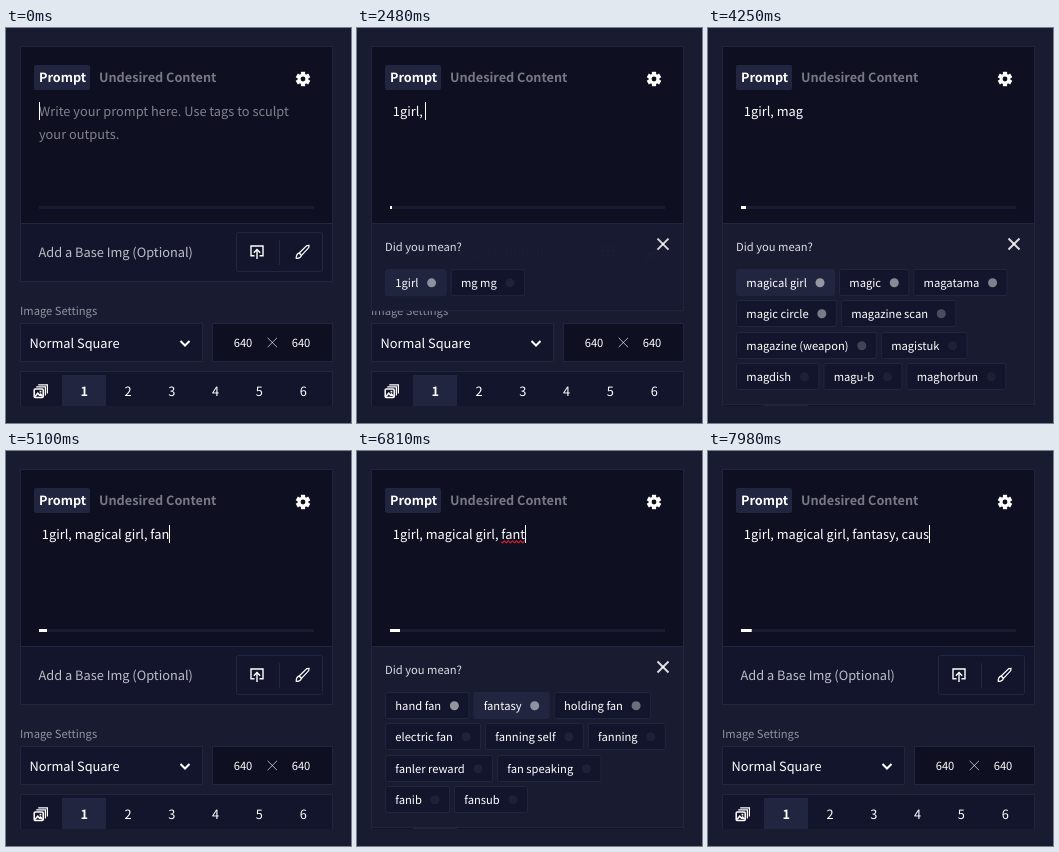
These frames come from a looping animation (345x395 px, 8000 ms). An HTML page with a canvas:

```html
<!DOCTYPE html>
<html lang="en">
<head>
<meta charset="utf-8">
<title>Prompt suggestions</title>
<style>
  html, body { margin: 0; width: 100%; height: 100%; overflow: hidden; background: #191b31; }
  canvas { display: block; width: 345px; height: 395px; }
</style>
</head>
<body>
<canvas id="stage"></canvas>
<script>
const W = 345, H = 395, LOOP = 8000;
const canvas = document.getElementById('stage');
const ctx = canvas.getContext('2d');
const dpr = window.devicePixelRatio || 1;
canvas.width = W * dpr;
canvas.height = H * dpr;

const FAMILY = '"Noto Sans CJK JP", "Noto Sans CJK SC", "Noto Sans CJK", "Source Sans 3", "Open Sans", sans-serif';
const NORMAL = `12.8px ${FAMILY}`;
const SMALL = `11.2px ${FAMILY}`;
const BOLD = `bold 12.7px ${FAMILY}`;

const C = { page: '#191b31', field: '#0e0f21', panel: '#13152c', line: '#22253f', white: '#fff' };
const white = a => `rgba(255,255,255,${a})`;
const clamp = v => Math.max(0, Math.min(1, v));
const ramp = (t, start, length) => clamp((t - start) / length);
const easeOut = p => 1 - (1 - p) * (1 - p);

// time, prompt text, width of the token bar
const typing = [
  [0, '', 0],
  [850, '1', 1],
  [1010, '1g', 2],
  [2480, ' 1girl, ', 3.5],
  [2990, ' 1girl, m', 4],
  [3070, ' 1girl, ma', 4.5],
  [3150, ' 1girl, mag', 5],
  [4560, ' 1girl, magical girl, ', 7],
  [5000, ' 1girl, magical girl, f', 7.5],
  [5050, ' 1girl, magical girl, fa', 8],
  [5100, ' 1girl, magical girl, fan', 8.5],
  [5180, ' 1girl, magical girl, fant', 10],
  [6910, ' 1girl, magical girl, fantasy, ', 10],
  [7800, ' 1girl, magical girl, fantasy, c', 10.2],
  [7860, ' 1girl, magical girl, fantasy, ca', 10.4],
  [7920, ' 1girl, magical girl, fantasy, cau', 10.7],
  [7980, ' 1girl, magical girl, fantasy, caus', 11]
];

// the caret toggles at each of these times, starting visible
const blinks = [380, 770, 1400, 1840, 2230, 2480, 3390, 3760, 4150, 4560, 4940, 5000, 6120, 6510, 7190, 7580];

// each tag: name, dot opacity
const popups = [
  { from: 1390, to: 2480, hover: { '1girl': [1820, 2700] },
    rows: [[['1girl', .5], ['mg mg', .06]]] },
  { from: 3610, to: 4550, hover: { 'magical girl': [4140, 4800] },
    rows: [
      [['magical girl', .52], ['magic', .5], ['magatama', .46]],
      [['magic circle', .44], ['magazine scan', .24]],
      [['magazine (weapon)', .2], ['magistuk', .05]],
      [['magdish', .05], ['magu-b', .05], ['maghorbun', .05]]
    ] },
  { from: 5560, to: 6905, hover: { 'hand fan': [5930, 6120], 'fantasy': [6160, 7200] },
    rows: [
      [['hand fan', .55], ['fantasy', .5], ['holding fan', .38]],
      [['electric fan', .06], ['fanning self', .06], ['fanning', .05]],
      [['fanler reward', .05], ['fan speaking', .05]],
      [['fanib', .05], ['fansub', .05]]
    ] }
];

function text(str, x, y, font = NORMAL, color = C.white, align = 'left') {
  ctx.font = font;
  ctx.fillStyle = color;
  ctx.textAlign = align;
  ctx.fillText(str, x, y);
}

function measure(str, font) {
  ctx.font = font;
  return ctx.measureText(str).width;
}

function rect(x, y, w, h, color) {
  ctx.fillStyle = color;
  ctx.fillRect(x, y, w, h);
}

function box(x, y, w, h, fill, radius = 0) {
  ctx.beginPath();
  ctx.roundRect(x + .5, y + .5, w - 1, h - 1, radius);
  ctx.fillStyle = fill;
  ctx.fill();
  ctx.strokeStyle = C.line;
  ctx.lineWidth = 1;
  ctx.stroke();
}

function path(points, color, width, close) {
  ctx.beginPath();
  points.forEach(([x, y], i) => i ? ctx.lineTo(x, y) : ctx.moveTo(x, y));
  if (close) ctx.closePath();
  ctx.strokeStyle = color;
  ctx.lineWidth = width;
  ctx.stroke();
}

function cross(x, y, r, color, width) {
  path([[x - r, y - r], [x + r, y + r]], color, width);
  path([[x - r, y + r], [x + r, y - r]], color, width);
}

function gear(x, y) {
  ctx.save();
  ctx.translate(x, y);
  for (let i = 0; i < 3; i++) {
    rect(-2.1, -7.2, 4.2, 14.4, C.white);
    ctx.rotate(Math.PI / 3);
  }
  ctx.beginPath();
  ctx.arc(0, 0, 5.4, 0, 7);
  ctx.fill();
  ctx.beginPath();
  ctx.arc(0, 0, 2.4, 0, 7);
  ctx.fillStyle = C.field;
  ctx.fill();
  ctx.restore();
}

function uploadIcon() {
  path([[248.5, 227.7], [245, 227.7], [245, 218], [257, 218], [257, 227.7], [253.5, 227.7]], C.white, 1.4);
  path([[251, 231], [251, 221.5]], C.white, 1.4);
  path([[247.8, 224.7], [251, 221.5], [254.2, 224.7]], C.white, 1.4);
}

function brushIcon() {
  path([[293.2, 225], [300.8, 217.6], [303, 217.4], [302.8, 219.6], [295.5, 227.3]], C.white, 1.2, true);
  ctx.beginPath();
  ctx.moveTo(293.2, 225.2);
  ctx.quadraticCurveTo(290.2, 225.8, 290.2, 230.3);
  ctx.quadraticCurveTo(294.6, 230.6, 295.4, 227.4);
  ctx.closePath();
  ctx.stroke();
}

function stackIcon() {
  path([[32.2, 356.8], [41.4, 356.8], [41.4, 365.6]], C.white, 1.2);
  path([[30.2, 358.9], [39.4, 358.9], [39.4, 367.6]], C.white, 1.2);
  ctx.beginPath();
  ctx.roundRect(28.2, 361, 9, 8.6, 1);
  ctx.lineWidth = 1.5;
  ctx.stroke();
  path([[29, 368.4], [31.7, 365.2], [33.4, 367], [34.6, 366], [36.6, 368.4]], C.white, 1.5);
  rect(33.6, 362.8, 1.7, 1.7, C.white);
}

function drawPrompt(t) {
  box(14, 18, 313, 236, C.panel);
  rect(15, 19, 311, 176, C.field);
  rect(15, 195, 311, 1, C.line);

  ctx.beginPath();
  ctx.roundRect(28, 37, 56, 25, 2);
  ctx.fillStyle = C.line;
  ctx.fill();
  text('Prompt', 33, 54, BOLD);
  text('Undesired Content', 93, 54, BOLD, white(.44));
  gear(297, 51);

  const step = typing.findLastIndex(s => t >= s[0]);
  const [start, str, target] = typing[step];
  const before = step ? typing[step - 1][2] : 0;
  if (str) {
    text(str, 33, 88);
  } else {
    text('Write your prompt here. Use tags to sculpt', 33, 88, NORMAL, white(.48));
    text('your outputs.', 33, 111, NORMAL, white(.48));
  }

  if (t >= 5940 && t < 6910) {
    const x0 = 33 + measure(str.slice(0, -4), NORMAL);
    const x1 = 33 + measure(str, NORMAL);
    const wave = [];
    for (let x = x0; x <= x1; x += .5) wave.push([x, 90.8 + Math.sin((x - x0) * 1.55)]);
    path(wave, '#e0222c', 1.1);
  }

  if (blinks.filter(b => t >= b).length % 2 === 0) {
    rect(Math.round(33 + measure(str, NORMAL) - .3), 74, 1, 18, C.white);
  }

  rect(33, 178, 275, 3, C.page);
  rect(33, 178, before + (target - before) * ramp(t, start, 120), 3, C.white);
}

function drawSettings() {
  text('Add a Base Img (Optional)', 32.5, 229, NORMAL, white(.72));
  box(230, 204, 87, 40, C.panel, 2);
  rect(273, 212, 1, 25, C.line);
  uploadIcon();
  brushIcon();

  text('Image Settings', 14, 286.5, SMALL, white(.52));
  box(14, 295, 183, 39, C.panel);
  text('Normal Square', 23.5, 320);
  path([[174.5, 313], [179, 317.5], [183.5, 313]], C.white, 2);
  box(206, 295, 121, 39, C.field);
  text('640', 237, 319, SMALL, C.white, 'center');
  text('640', 295, 319, SMALL, C.white, 'center');
  cross(266.3, 314.5, 4.7, white(.65), 1);

  box(14, 343, 313, 44, C.panel);
  rect(56, 347, 44, 40, C.line);
  stackIcon();
  for (let n = 1; n <= 6; n++) {
    text(String(n), 34.4 + 43.8 * n, 368, n === 1 ? BOLD : NORMAL, C.white, 'center');
  }
}

function drawTag(name, dot, x, y, glow) {
  const w = measure(name, SMALL) + 38.5;
  box(x, y, w, 27, C.panel, 2);
  if (glow > 0) {
    ctx.save();
    ctx.globalAlpha *= glow;
    box(x, y, w, 27, C.line, 2);
    ctx.restore();
  }
  text(name, x + 10.3, y + 18, SMALL);
  ctx.beginPath();
  ctx.arc(x + w - 15, y + 13.7, 4.5, 0, 7);
  ctx.fillStyle = white(dot);
  ctx.fill();
  return w;
}

function drawPopup(p, t) {
  const shown = easeOut(ramp(t, p.from, 150)) * (1 - easeOut(ramp(t, p.to, 150)));
  if (shown <= 0) return;
  ctx.save();
  ctx.globalAlpha = shown;
  ctx.translate(0, 10 * (1 - shown));
  box(14, 195, 313, 88 + 31.3 * (p.rows.length - 1), C.page);
  text('Did you mean?', 28, 223, SMALL, white(.85));
  cross(306, 216, 5.5, white(.85), 2);
  p.rows.forEach((row, i) => {
    let x = 28;
    for (const [name, dot] of row) {
      const h = p.hover[name];
      const glow = h ? ramp(t, h[0], 40) * (1 - ramp(t, h[1], 40)) : 0;
      x += drawTag(name, dot, x, 241 + Math.round(31.3 * i), glow) + 4;
    }
  });
  ctx.restore();
}

function draw(t) {
  ctx.setTransform(dpr, 0, 0, dpr, 0, 0);
  ctx.textRendering = 'geometricPrecision';
  ctx.fontKerning = 'normal';
  rect(0, 0, W, H, C.page);
  ctx.save();
  ctx.beginPath();
  ctx.rect(0, 0, W, 378);
  ctx.clip();
  drawPrompt(t);
  drawSettings();
  popups.forEach(p => drawPopup(p, t));
  ctx.restore();
}

const begin = performance.now();
function tick() {
  draw((performance.now() - begin) % LOOP);
  requestAnimationFrame(tick);
}
tick();
</script>
</body>
</html>
```
